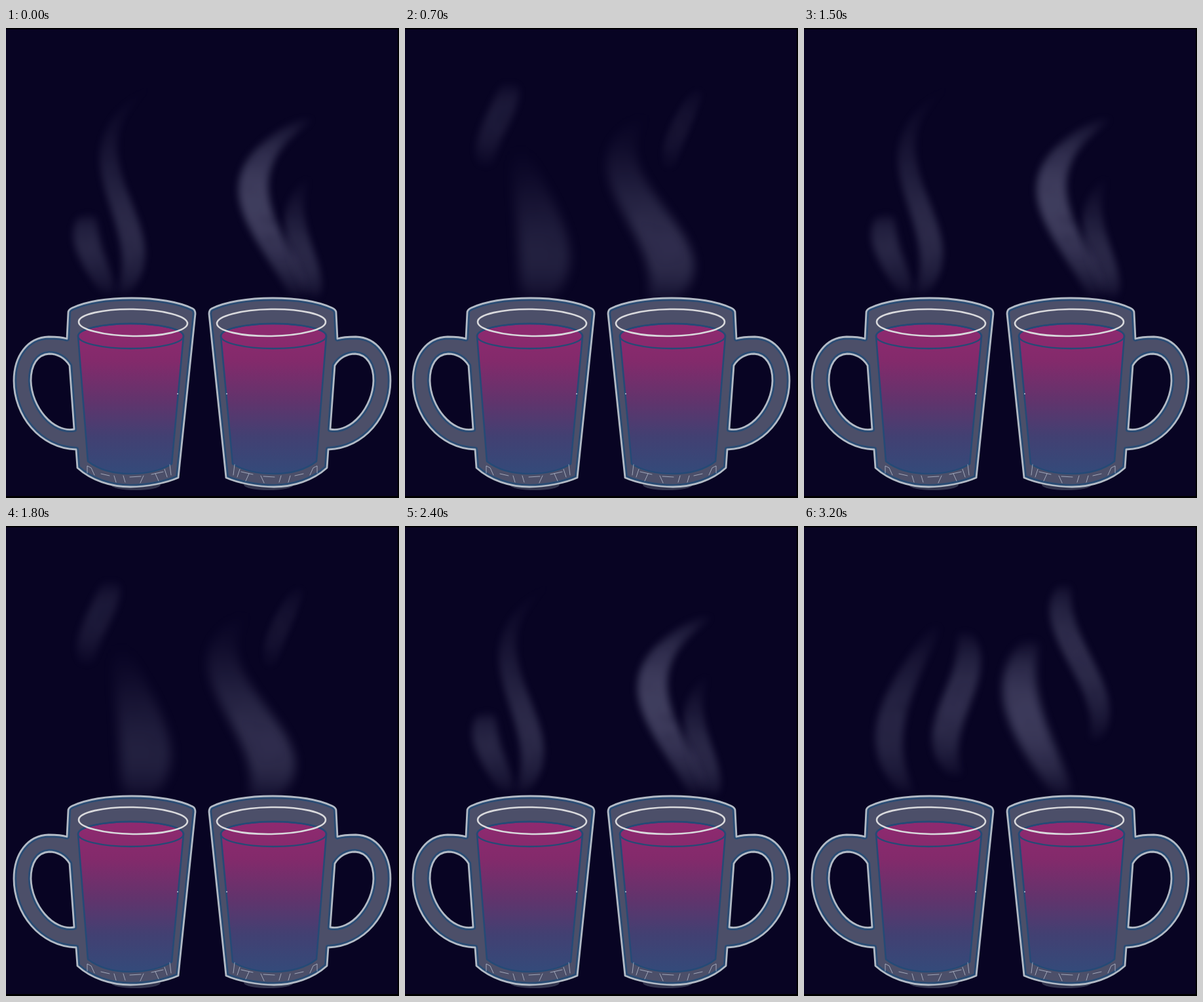
Recreate the animation shown at these times as an HTML page with a canvas. Size 600 px wide and 717 px high, loop 3.6 s.

```html
<!DOCTYPE html>
<html lang="en">
<head>
<meta charset="utf-8">
<title>Two steaming mugs</title>
<style>
html, body { margin: 0; width: 100%; height: 100%; overflow: hidden; background: #000; }
canvas { display: block; width: 600px; height: 717px; }
</style>
</head>
<body>
<canvas id="stage" width="600" height="717"></canvas>
<script>
const W = 600, H = 717, HOLD = 400;
const ctx = document.getElementById('stage').getContext('2d');

function layer() {
  const c = document.createElement('canvas');
  c.width = W;
  c.height = H;
  return c.getContext('2d');
}

let seed = 91;
const random = () => (seed = (seed * 16807) % 2147483647) / 2147483647;

// Cubic through four values spaced evenly over t = 0..1
function cubic([a, b, c, d], t) {
  const u = 3 * t - 1, v = 2 - 3 * t, w = 1 - t;
  return -a * u * v * w / 2 + 4.5 * t * w * (b * v + c * u) - d * t * u * v / 2;
}

// A soft band of steam that swells and brightens towards t = peak
function wisp(out, top, bottom, spine, width, opacity, peak) {
  const g = layer(), bend = Math.log(0.5) / Math.log(peak);
  const span = t => {
    const swell = Math.max(0, Math.sin(Math.PI * t ** bend));
    const half = width * (0.3 + 0.62 * Math.sqrt(swell)) / 2;
    return { x: cubic(spine, t), half, swell };
  };
  for (let y = top; y <= bottom; y++) {
    const { x, half, swell } = span((y - top) / (bottom - top));
    g.fillStyle = `rgba(150,152,186,${opacity * swell ** 0.7})`;
    g.fillRect(x - half, y, 2 * half, 1);
  }
  // faint mottled brush texture
  g.globalCompositeOperation = 'destination-out';
  for (let i = 0; i < 40; i++) {
    const t = random(), { x, half } = span(t);
    g.fillStyle = `rgba(0,0,0,${0.03 + random() * 0.07})`;
    g.beginPath();
    g.ellipse(x + (random() * 2 - 1) * half, top + t * (bottom - top),
      2 + random() * 6, 2 + random() * 4, random() * 3, 0, 7);
    g.fill();
  }
  out.filter = `blur(${2.5 + width / 14}px)`;
  out.drawImage(g.canvas, 0, 0);
  out.filter = 'none';
}

function curl(g) {
  wisp(g, 85, 408, [226, 157, 186, 176], 40, 0.25, 0.7);
  wisp(g, 284, 408, [125, 124, 139, 158], 44, 0.23, 0.4);
  wisp(g, 137, 412, [462, 379, 402, 447], 50, 0.39, 0.48);
  wisp(g, 226, 412, [462, 441, 455, 470], 40, 0.24, 0.65);
}

function plume(g) {
  wisp(g, 84, 212, [160, 147, 129, 124], 44, 0.15, 0.4);
  wisp(g, 178, 416, [173, 195, 212, 201], 84, 0.19, 0.7);
  wisp(g, 128, 420, [370, 337, 392, 388], 80, 0.28, 0.7);
  wisp(g, 92, 215, [448, 428, 411, 403], 34, 0.1, 0.5);
}

function ribbons(g) {
  wisp(g, 148, 410, [204, 155, 130, 161], 46, 0.22, 0.6);
  wisp(g, 160, 382, [244, 244, 219, 233], 50, 0.28, 0.5);
  wisp(g, 174, 413, [347, 330, 356, 397], 60, 0.37, 0.48);
  wisp(g, 89, 328, [398, 404, 442, 443], 43, 0.27, 0.42);
}

const body = new Path2D(
  'M93 474 L95 434 Q95 430 101 427 C125 416 155 412 192 412 C230 412 265 418 285 428 ' +
  'Q289 430 289 436 L263 686 C245 694 215 700 190 700 C160 700 130 690 109 671 L107 643 ' +
  'C51 641 12 591 12 538 C12 500 33 472 65 471 C74 471 84 471 93 474 Z ' +
  'M97 515 C90 503 78 497 66 497 C48 498 38 514 38 538 C39 578 72 618 104 612 Z');
const liquid = new Path2D(
  'M110 470 A80.5 19 0 0 1 271 470 L253 665 C235 676 213 680 190 680 C165 680 143 675 125 661 Z');
const surface = new Path2D('M110 470 A80.5 19 0 0 0 271 470 A80.5 19 0 0 0 110 470');
const marks = new Path2D(
  'M124 679 V668 L130 671 L135 682 M145 680 L158 683 M165 683 L168 693 ' +
  'M182 693 L179 683 M189 685 L206 684 M210 683 L205 694 M222 681 L240 677 ' +
  'M228 680 L233 691 M242 673 L246 685 M250 666 L252 682');

function line(g, path, color, width) {
  g.strokeStyle = color;
  g.lineWidth = width;
  g.stroke(path);
}

function drawMug(g) {
  g.lineJoin = g.lineCap = 'round';
  g.fillStyle = '#34364f';
  g.beginPath();
  g.ellipse(198, 697, 38, 8, 0, 0, 7);
  g.fill();

  g.fillStyle = '#4c4f69';
  g.fill(body, 'evenodd');
  g.save();
  g.clip(body, 'evenodd');
  line(g, body, '#2a4c74', 8.5);
  g.restore();
  line(g, body, '#b2bac5', 2.8);

  const grad = g.createLinearGradient(0, 451, 0, 680);
  ['#8f2a70', '#832a6b', '#63336c', '#424072', '#344a7a']
    .forEach((color, i) => grad.addColorStop(i / 4, color));
  g.fillStyle = grad;
  g.fill(liquid);
  line(g, liquid, '#254a76', 2.6);
  line(g, surface, '#254a76', 2.4);
  line(g, marks, 'rgba(190,197,212,.75)', 1);

  const rim = new Path2D();
  rim.ellipse(194, 449.5, 83, 20.5, 0.015, 0, 7);
  line(g, rim, '#d9d9dc', 2.6);
  g.fillStyle = '#9aa6ba';
  g.fillRect(261, 557, 2, 2);
}

const mugs = layer();
drawMug(mugs);
mugs.translate(599, 0);
mugs.scale(-1, 1);
drawMug(mugs);

const poses = [curl, plume, ribbons].map(steam => {
  const g = layer();
  g.fillStyle = '#000';
  g.fillRect(0, 0, W, H);
  g.fillStyle = '#080423';
  g.fillRect(0, 2, 598, 712);
  steam(g);
  g.drawImage(mugs.canvas, 0, 0);
  return g.canvas;
});

const start = performance.now();
function frame(now) {
  const step = Math.floor(Math.max(0, now - start) / HOLD);
  ctx.drawImage(poses[step % poses.length], 0, 0);
  requestAnimationFrame(frame);
}
frame(start);
</script>
</body>
</html>
```
